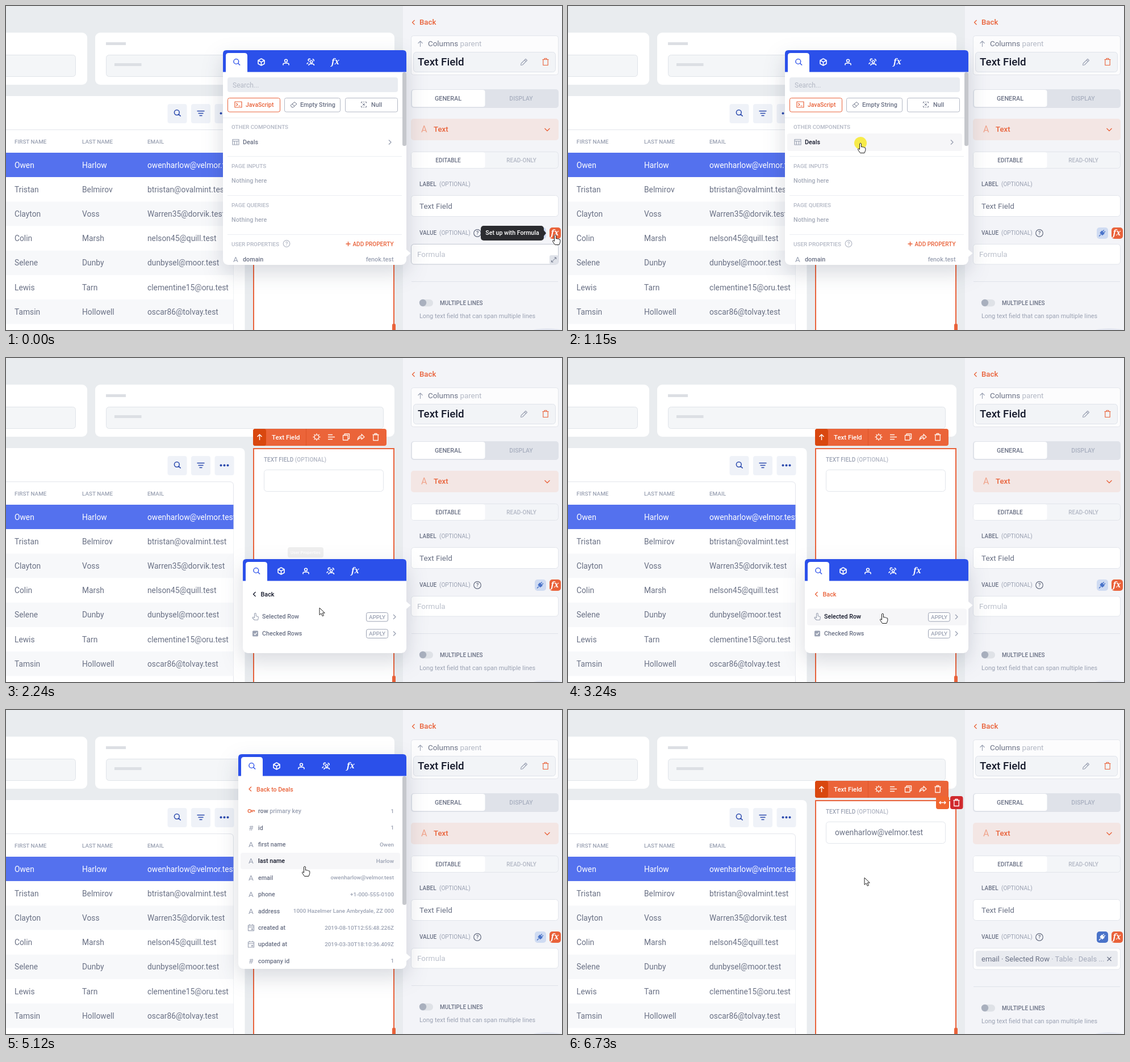
Recreate the animation shown at these times as an HTML page. Size 979 by 572 pixels, loop 7.13 s.

```html
<!DOCTYPE html>
<html lang="en">
<head>
<meta charset="utf-8">
<title>Formula picker</title>
<style>
html, body { margin: 0; width: 100%; height: 100%; overflow: hidden; background: #e9ecef; }
svg { display: block; }
text { font-family: Roboto, sans-serif; white-space: pre; }
.fx { font: italic bold 14px "Noto Serif", serif; }
.popup { filter: drop-shadow(0 14px 18px rgba(26, 37, 64, .17)); }
</style>
</head>
<body>
<svg width="979" height="572" viewBox="0 0 979 572">
  <defs><clipPath id="table"><rect width="400.5" height="572"/></clipPath></defs>
  <g id="page"></g>
  <g id="live"></g>
  <circle id="click" r="11" fill="#f7e92b" opacity=".85"/>
  <g id="arrow"><path d="M0 0V12.5L3 9.8 5.2 14.6 7.4 13.6 5.2 9H9.3Z" fill="#fff" stroke="#222" stroke-linejoin="round"/></g>
  <g id="hand"><path d="M-1.5 1Q0-1 1.4 1V7Q3 5.6 4.2 7.3 5.8 6.3 6.7 8 8.6 7.4 8.8 9.3V12.5L7 17.5H-.5L-4.2 12Q-5 9.8-3.3 9.7L-1.5 11.3Z" fill="#fff" stroke="#222" stroke-linejoin="round"/></g>
</svg>
<script>
const ORANGE = '#e9623a', BLUE = '#2b50ea', NAVY = '#2a49ad', SLATE = '#6a7185',
      GRAY = '#9ba2b3', PALE = '#b3b8c5', LINE = '#e2e5eb', INK = '#14182a', WHITE = '#fff';
const $ = id => document.getElementById(id);

// Drawing helpers: y of text is its vertical centre
const text = (x, y, s, size, fill, weight = 400, anchor = 'start') =>
  `<text x="${x}" y="${y + size * .36}" font-size="${size}" font-weight="${weight}" fill="${fill}" text-anchor="${anchor}">${s}</text>`;
const bold = (x, y, s, fill, size = 10.8, anchor) => text(x, y, s, size, fill, 500, anchor);
const tone = (s, fill, weight = 400) => `<tspan fill="${fill}" font-weight="${weight}">${s}</tspan>`;
const rect = (x, y, w, h, r, fill, stroke) => stroke
  ? `<rect x="${x + .5}" y="${y + .5}" width="${w - 1}" height="${h - 1}" rx="${r}" fill="${fill}" stroke="${stroke}"/>`
  : `<rect x="${x}" y="${y}" width="${w}" height="${h}" rx="${r}" fill="${fill}"/>`;
const rule = (x, y, w, fill = LINE) => rect(x, y, w, 1, 0, fill);
const fx = (x, y, fill) => `<text class="fx" x="${x}" y="${y + 5}" fill="${fill}" text-anchor="middle">fx</text>`;

const ICONS = {
  search: 'M3.2-1A4.4 4.4 0 1 1-5.6-1 4.4 4.4 0 1 1 3.2-1M2.2 2.2 5.6 5.6',
  cube: 'M0-6 5.5-3V3L0 6-5.5 3V-3ZM-5.5-3 0 0 5.5-3M0 0V6',
  person: 'M2.4-2.4A2.4 2.4 0 1 1-2.4-2.4 2.4 2.4 0 1 1 2.4-2.4M-5 5.4V4Q-5 2-2.5 2H2.5Q5 2 5 4V5.4',
  people: 'M3.2-.6A2.1 2.1 0 1 1-1-.6 2.1 2.1 0 1 1 3.2-.6M-3.5 6Q-3.5 3.2-1 3.2H3.5Q6 3.2 6 6M-2.6-1.6A2 2 0 1 1-.6-4.6M-6.5 3.6Q-6.3 1.4-4 1.2M3-4.8A2 2 0 0 1 5.2-1.6',
  filter: 'M-6.5-4H6.5M-4.5 0H4.5M-2.5 4H2.5',
  up: 'M0 5V-5M-4-1 0-5 4-1',
  left: 'M2-4-2 0 2 4',
  right: 'M-2-4 2 0-2 4',
  down: 'M-4.5-2 0 2.5 4.5-2',
  trash: 'M-5.5-4H5.5M-2-4V-6H2V-4M-4.2-4V6H4.2V-4',
  pencil: 'M-5.5 5.5-5 2.5 3-5.5 5.5-3-2.5 5ZM1-3.5 3.5-1',
  gear: 'M3.8 0A3.8 3.8 0 1 1-3.8 0 3.8 3.8 0 1 1 3.8 0M0-4V-6.5M0 4V6.5M-4 0H-6.5M4 0H6.5M-2.8-2.8-4.6-4.6M2.8 2.8 4.6 4.6M2.8-2.8 4.6-4.6M-2.8 2.8-4.6 4.6',
  lines: 'M-6-4H2M-6 0H6M-6 4H2',
  copy: 'M-5.5-3H3V5.5H-5.5ZM-3-3V-5.5H5.5V3H3',
  share: 'M-6 5Q-5-2 1-2V-5L6 0 1 4V1Q-3 1-6 5Z',
  wide: 'M-5.5 0H5.5M-3-2.5-5.5 0-3 2.5M3-2.5 5.5 0 3 2.5',
  cross: 'M-3.5-3.5 3.5 3.5M3.5-3.5-3.5 3.5',
  grid: 'M-5.5-4.5H5.5V5H-5.5ZM-5.5-1.5H5.5M-2-1.5V5M2-1.5V5',
  code: 'M-6-5H6V5H-6ZM-3.5-2.5-1.2 0-3.5 2.5M.5 2.5H3.5',
  eraser: 'M-5.5 1.5 1.5-4.5 5.5-1-1 5H-3ZM-2.5-1 1.5 3',
  none: 'M-4.5-2.5V-4.5H-2.5M2.5-4.5H4.5V-2.5M4.5 2.5V4.5H2.5M-2.5 4.5H-4.5V2.5M-2-2 2 2M2-2-2 2M-.8-4.5H.8M-.8 4.5H.8',
  date: 'M-5-4H5V5.5H-5ZM-5-1H5M-2.5-6V-4M2.5-6V-4M1 2H3V3.5H1Z',
  key: 'M0 0A2.7 2.7 0 1 1-5.4 0 2.7 2.7 0 1 1 0 0M0-1H6V1.5M0 1H4',
  point: 'M-1.5 2V-5Q0-7 1.2-5V-1L4.5 0Q5.8.5 5.4 2L4.5 6H-1.5L-5 2.5Q-5 .5-3.2 1.2Z',
  plug: 'M-6 6-3 3M-3.8.2-.2 3.8 3 1.2-1.2-3ZM-.2-2 2.8-5M2 .2 5-2.8',
  plus: 'M-4 0H4M0-4V4',
  expand: 'M1-4H4V-1M4-4-4 4M-1 4H-4V1'
};
const icon = (name, x, y, color, width = 1.2, fill = 'none') =>
  `<path transform="translate(${x} ${y})" d="${ICONS[name]}" fill="${fill}" stroke="${color}" stroke-width="${width}" stroke-linejoin="round"/>`;
const help = (x, y, color, r) =>
  `<circle cx="${x}" cy="${y}" r="${r}" fill="none" stroke="${color}" stroke-width="1.2"/>` + bold(x, y, '?', color, 9.5, 'middle');

const OWNER = 'owenharlow@velmor.test';
const PEOPLE = [
  ['Owen', 'Harlow', OWNER],
  ['Tristan', 'Belmirov', 'btristan@ovalmint.test'],
  ['Clayton', 'Voss', 'Warren35@dorvik.test'],
  ['Colin', 'Marsh', 'nelson45@quill.test'],
  ['Selene', 'Dunby', 'dunbysel@moor.test'],
  ['Lewis', 'Tarn', 'clementine15@oru.test'],
  ['Tamsin', 'Hollowell', 'oscar86@tolvay.test']
];
const FIELDS = [
  ['key', 'row', '1'], ['#', 'id', '1'], ['A', 'first name', 'Owen'], ['A', 'last name', 'Harlow'],
  ['A', 'email', OWNER], ['A', 'phone', '+1-000-555-0100'],
  ['A', 'address', '1000 Hazelmer Lane Ambrydale, ZZ 000'],
  ['date', 'created at', '2019-08-10T12:55:48.226Z'],
  ['date', 'updated at', '2019-03-30T18:10:36.409Z'], ['#', 'company id', '1']
];
const FIELD_STEP = 29.4, FIELD_TOP = 178.3;

function table() {
  const columns = [15, 134, 249];
  let s = rect(-10, 159, 430.5, 440, 8, WHITE);
  s += `<path d="M0 218.5H394Q400.5 218.5 400.5 225V572" fill="none" stroke="${LINE}"/>`;
  [301.5, 343, 384.5].forEach(x => s += rect(x - 17, 173, 34, 34, 4, '#eff2f8'));
  s += icon('search', 302, 189, NAVY, 1.5) + icon('filter', 343, 189.5, NAVY, 1.5);
  [-6, 0, 6].forEach(d => s += `<circle cx="${384.5 + d}" cy="189.5" r="2" fill="${NAVY}"/>`);
  ['FIRST NAME', 'LAST NAME', 'EMAIL'].forEach((h, i) => s += bold(columns[i], 239, h, GRAY, 9.9));
  const rows = PEOPLE.map((person, i) => {
    const y = 259 + i * 43.2, fill = i ? i % 2 ? WHITE : '#f7f8fa' : '#5471ee';
    return rect(0, y, 401, 43.2, 0, fill) +
      person.map((v, c) => text(columns[c], y + 21.7, v, 13.8, i ? SLATE : WHITE)).join('');
  });
  return s + `<g clip-path="url(#table)">${rows.join('')}</g>`;
}

function component() {
  let s = rect(435, 159, 249, 430, 3, WHITE) +
    `<path d="M436 580V160H683V580" fill="none" stroke="${ORANGE}" stroke-width="2"/>` +
    rect(680, 561, 6, 14, 2, ORANGE) +
    rect(435, 125, 235, 30, 4, '#eb6439') + rect(435, 125, 23, 30, 4, '#d9470f') +
    icon('up', 446.5, 140, WHITE, 1.4) + bold(468, 139.5, 'Text Field', WHITE, 11.4) +
    rect(528, 125, 1, 30, 0, '#de5429');
  ['gear', 'lines', 'copy', 'share', 'trash'].forEach((n, i) => s += icon(n, 547 + i * 26, 139.5, '#fff2ec', 1.3));
  return s + bold(454, 179, `TEXT FIELD ${tone('(OPTIONAL)', PALE, 500)}`, GRAY, 10) +
    rect(454, 197, 211, 39, 5, WHITE, LINE);
}

function panel() {
  return rect(699, 0, 280, 572, 0, '#f3f4f8') +
    icon('left', 717.5, 29, ORANGE, 1.3) + bold(728, 28.5, 'Back', ORANGE, 13.2) +
    rect(713, 52, 260, 70, 4, '#fcfcfd', LINE) + icon('up', 729.5, 67, GRAY, 1.1) +
    text(743, 66.5, `Columns ${tone('parent', PALE)}`, 13.4, SLATE) +
    rect(717, 81, 251, 36, 5, '#f2f4f7', '#dfe3ea') + bold(725, 98.5, 'Text Field', INK, 18.8) +
    icon('pencil', 912, 99, GRAY, 1.1) + icon('trash', 950, 98.5, ORANGE, 1.1) +
    rect(713, 147, 260, 33, 5, '#dfe2e9') + rect(715, 148, 128.5, 30, 4, WHITE) +
    bold(778.5, 163, 'GENERAL', SLATE, 10.8, 'middle') + bold(907, 163, 'DISPLAY', '#a9b0c0', 10.5, 'middle') +
    rect(713, 199, 260, 38, 5, '#f3e6e4') + text(731, 217.5, 'A', 16, '#f0a48c') +
    bold(753, 217.5, 'Text', ORANGE, 13.2) + icon('down', 953, 218, ORANGE, 1.3) +
    rect(713, 257, 260, 30, 5, '#f3f5f8', LINE) + rect(714, 258, 129.5, 28, 4, WHITE) +
    bold(778.5, 272, 'EDITABLE', SLATE, 10, 'middle') + bold(907.5, 272, 'READ-ONLY', PALE, 10, 'middle') +
    bold(728, 314.5, 'LABEL', SLATE, 10) + text(763, 314.5, '(OPTIONAL)', 10, GRAY) +
    rect(713, 334, 260, 38, 5, WHITE, LINE) + text(728, 353, 'Text Field', 13.5, SLATE) +
    bold(728, 400.5, 'VALUE', SLATE, 10) + text(763, 400.5, '(OPTIONAL)', 10, GRAY) +
    help(830, 401, '#666d80', 6.3) +
    rect(957, 391, 20, 20, 5, ORANGE) + fx(966.5, 400, WHITE) +
    '<ellipse cx="953" cy="574" rx="27" ry="5" fill="#e4e7f1"/>';
}

$('page').innerHTML = rect(0, 0, 979, 572, 0, '#e9ecef') +
  rect(-10, 47, 153, 92, 9, WHITE) + rect(-10, 86, 133, 39, 5, '#f4f6f8', '#e0e4e9') +
  rect(157, 47, 527, 92, 9, WHITE) + rect(176, 64, 35, 5, 0, '#dcdfe4') +
  rect(176, 86, 489, 39, 5, '#f4f6f8', '#e0e4e9') + rect(191, 101, 47.5, 5, 0, '#dcdfe4') +
  table() + component() + panel();

// Value box and what follows it in the side panel
function valueArea(scene, t) {
  const filled = scene === 4, shift = filled ? 2 : 0, focused = t < 205;
  let s = rect(931, 391, 20, 20, 5, filled ? '#4a73c9' : '#cfdbf2') +
    icon('plug', 941, 400.5, filled ? WHITE : '#4a73c9', 1.3, filled ? WHITE : '#4a73c9') +
    rect(713, 420, 260, 36.5 + shift, 5, WHITE, focused ? '#c3c8d2' : LINE);
  if (filled) s += rect(718, 425, 250, 28, 4, '#e9ebf0') +
    text(728, 439, `email · Selected Row${tone(' · Table · Deals ...', '#a4aaba')}`, 13, SLATE) +
    icon('cross', 953, 439.5, SLATE, 1.1);
  else s += text(724, 438, 'Formula', 13.5, '#bcc1cc');
  if (focused) s += rect(957, 440, 15.5, 16, 3, '#dfe2e9') + icon('expand', 964.5, 448, SLATE, 1);
  s += rule(714, 486 + shift, 258, '#dfe2e9') + rect(728, 518 + shift, 24, 12.5, 6.2, '#dfe2e7') +
    `<circle cx="734" cy="${524 + shift}" r="6.2" fill="#a9b0be"/>` +
    bold(764, 524 + shift, 'MULTIPLE LINES', SLATE, 10) +
    text(728, 547.5 + shift, 'Long text field that can span multiple lines', 10.9, GRAY);
  if (t < 140) s += rect(836, 388, 111, 26, 5, '#2b2c30') +
    '<path d="M947 396 951 401 947 406Z" fill="#2b2c30"/>' + bold(891.5, 400.5, 'Set up with Formula', WHITE, 10.6, 'middle');
  return s;
}

function frame(x, y, h) {
  const right = 705;
  let s = rect(x, y, right - x, h, 9, WHITE) + `<path d="M${right} 430 712.5 436.5 ${right} 443Z" fill="#fff"/>` +
    `<path d="M${x} ${y + 38.5}V${y + 6}q0-6 6-6H${right - 6}q6 0 6 6V${y + 38.5}Z" fill="${BLUE}"/>` +
    `<path d="M${x + 5} ${y + 39}V${y + 10}q0-5 5-5h28q5 0 5 5V${y + 39}Z" fill="#fff"/>` +
    icon('search', x + 24.5, y + 21, BLUE, 1.4);
  ['cube', 'person', 'people'].forEach((n, i) => s += icon(n, x + 67.5 + i * 43.5, y + 21, WHITE, 1.6));
  return s + fx(x + 198, y + 20, WHITE);
}

const mark = (kind, x, y) => kind in ICONS
  ? icon(kind, x, y, kind === 'key' ? ORANGE : GRAY, 1.2)
  : text(x, y, kind, 13.5, GRAY, 400, 'middle');

const popups = {
  1(hover) {
    let s = frame(382, 78, 379) + rect(698, 117, 7, 130, 3, '#c5c7cc') +
      rect(390, 126, 300, 26, 4, '#e9ecf1') + text(399, 139.5, 'Search...', 12, '#b4b9c5') +
      rect(390, 162, 93, 25.5, 3, WHITE, ORANGE) + icon('code', 409, 174, ORANGE) + bold(422, 174, 'JavaScript', ORANGE, 10.4) +
      rect(490, 162, 99, 25.5, 3, WHITE, PALE) + icon('eraser', 506.5, 174, SLATE, 1) + bold(518, 174, 'Empty String', SLATE) +
      rect(597, 162, 93, 25.5, 3, WHITE, PALE) + icon('none', 630, 174, SLATE, 1) + bold(643, 174, 'Null', SLATE);
    if (hover) s += rect(386, 225, 308, 31, 4, '#f6f6f8');
    s += rule(382, 197, 316, '#eceef2');
    [265, 334, 403].forEach(y => s += rule(390, y, 307, '#eceef2'));
    [[213.5, 'OTHER COMPONENTS'], [282.5, 'PAGE INPUTS'], [351, 'PAGE QUERIES'], [420, 'USER PROPERTIES']]
      .forEach(([y, label]) => s += bold(397, y, label, PALE, 9.9));
    [308.5, 377].forEach(y => s += bold(397, y, 'Nothing here', '#a6acba'));
    return s + icon('grid', 404.5, 240, GRAY) + bold(417, 240, 'Deals', hover ? INK : SLATE) +
      icon('right', 676, 240.5, GRAY, 1.4) + help(494, 419.5, PALE, 5.8) +
      icon('plus', 602.5, 420, ORANGE, 1.4) + bold(682.5, 420, 'ADD PROPERTY', ORANGE, 10, 'end') +
      text(404.5, 447, 'A', 13.5, GRAY, 400, 'middle') + bold(417, 447, 'domain', SLATE) +
      bold(682.5, 447, 'fenok.test', GRAY, 10.8, 'end');
  },
  2(hover) {
    const back = hover === 0 ? INK : ORANGE;
    let s = frame(417, 355, 166) + icon('left', 437.5, 417, back, 1.3) + bold(448.5, 417.5, 'Back', back);
    if (hover === 1) s += rect(421, 442.5, 281, 29.5, 4, '#f6f6f8');
    s += icon('point', 439, 456.5, GRAY, 1.1) + rect(434, 481.5, 10, 10, 1.5, GRAY) +
      '<path d="M436.5 486.5 438.5 488.5 442 484.5" fill="none" stroke="#fff" stroke-width="1.3"/>';
    ['Selected Row', 'Checked Rows'].forEach((label, i) => {
      const y = 457 + i * 29.5;
      s += bold(451, y - .5, label, hover === 1 && !i ? INK : SLATE, 10.7) + rect(634, y - 8, 39, 16.5, 3, WHITE, GRAY) +
        bold(653.5, y, 'APPLY', GRAY, 9.9, 'middle') + icon('right', 684, y, GRAY, 1.4);
    });
    return s;
  },
  3(hover) {
    let s = frame(409, 78, 379) + rect(698, 117, 7, 227, 3, '#c5c7cc') +
      icon('left', 430, 139.5, ORANGE, 1.3) + bold(441, 140, 'Back to Deals', ORANGE, 10.6);
    FIELDS.forEach(([kind, label, value], i) => {
      const y = FIELD_TOP + i * FIELD_STEP;
      if (i === hover) s += rect(413, y - 14.5, 281, i === 9 ? 28 : 29, 4, '#f6f6f8');
      const name = i ? label : label + tone(' primary key', GRAY, 500);
      s += mark(kind, 431.5, y) + bold(444, y, name, i === hover ? INK : SLATE, 10.7) +
        bold(683, y, value, GRAY, 9.9, 'end');
    });
    return s;
  },
  4: () => ''
};

// Pointer hot spot: [time, x, y]
const LOOP = 7130;
const PATH = [
  [0, 967, 404], [70, 967, 404], [740, 522, 245], [950, 515, 242], [1810, 515, 242],
  [2240, 552, 441], [2380, 554, 451], [3770, 554, 451], [4050, 548, 394], [4460, 540, 327],
  [5120, 526, 276], [5450, 526, 276], [5650, 522, 296], [LOOP, 522, 296]
];
const CLICKS = [[1150, 1280], [3180, 3240], [5980, 6050]];
const within = (t, a, b) => t >= a && t < b;

function pointer(t) {
  const i = Math.max(1, PATH.findIndex(p => p[0] > t));
  const [t0, x0, y0] = PATH[i - 1], [t1, x1, y1] = PATH[i];
  let p = Math.max(0, (t - t0) / (t1 - t0));
  if (t1 === 740) p = p * p * (3 - 2 * p);
  return [x0 + (x1 - x0) * p, y0 + (y1 - y0) * p];
}

function hoverAt(scene, t) {
  const [x, y] = pointer(Math.max(0, t - 60));   // hover trails the pointer slightly
  if (scene === 1) return x < 694 && within(y, 225, 256);
  if (scene === 2) return within(y, 400, 442) ? 0 : y >= 442 ? 1 : -1;
  return Math.round((y - FIELD_TOP) / FIELD_STEP);
}

let shown = '';
function render(t) {
  const scene = t < 1280 ? 1 : t < 3310 ? 2 : t < 6110 ? 3 : 4;
  const [x, y] = pointer(t), hover = hoverAt(scene, t);
  let s = valueArea(scene, t);
  if (t >= 6410) s += text(470, 216.5, OWNER, 13.8, SLATE);
  if (within(t, 1280, 2060) || t >= 6270)
    s += rect(648, 152, 23, 23, 4, '#f0652f') + icon('wide', 659.5, 163.5, WHITE, 1.4) +
      rect(673, 152, 22.5, 23, 4, '#d02a2e') + icon('trash', 684, 163.5, WHITE, 1.3);
  s += `<g class="popup">${popups[scene](hover)}</g>`;
  if (within(t, 2080, 2300)) {
    const alpha = t < 2150 ? .6 : Math.max(0, .08 + (2240 - t) / 170);
    s += `<g opacity="${alpha.toFixed(2)}">${rect(496, 334, 63, 18.5, 4, '#2b2c30')}${bold(527.5, 343.5, 'User Properties', WHITE, 7.6, 'middle')}</g>`;
  }
  if (s !== shown) $('live').innerHTML = shown = s;

  const hand = scene === 1 ? t < 140 || hover : scene === 2 ? hover === 1 : t < 6540;
  for (const id of ['hand', 'arrow', 'click']) $(id).setAttribute('transform', `translate(${x.toFixed(1)} ${y.toFixed(1)})`);
  $('hand').style.display = hand ? '' : 'none';
  $('arrow').style.display = hand ? 'none' : '';
  $('click').style.display = CLICKS.some(([a, b]) => within(t, a, b)) ? '' : 'none';
}

const start = performance.now();
function tick() {
  render((performance.now() - start) % LOOP);
  requestAnimationFrame(tick);
}
tick();
</script>
</body>
</html>
```
